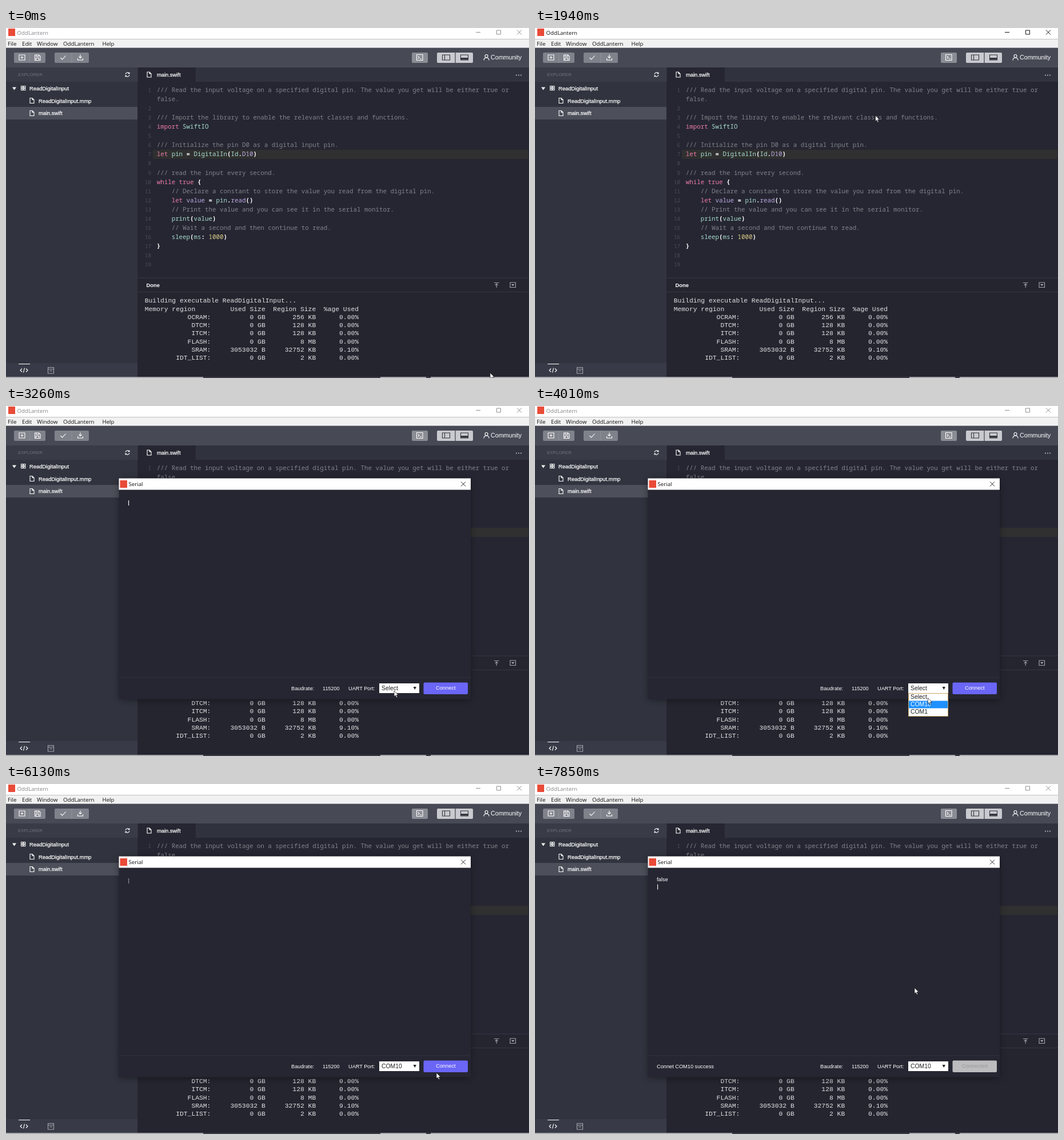
An HTML page for the animation above (8 s loop, 915x612 px).

```html
<!DOCTYPE html>
<html lang="en">
<head>
<meta charset="utf-8">
<title>Serial monitor</title>
<style>
  html, body { margin: 0; width: 100%; height: 100%; overflow: hidden; background: #252631; }
  svg { display: block; width: 915px; height: 612px; }
  text { white-space: pre; fill: #fff; font: 9.35px "Liberation Sans", Arial, sans-serif; }
  .sys { font: 9.7px "Open Sans", "Noto Sans", sans-serif; fill: #111; }
  .code { font: 10.82px "Noto Sans Mono", "DejaVu Sans Mono", monospace; }
  .num { font: 9.2px "Noto Sans Mono", monospace; fill: #4b4d59; text-anchor: end; }
  .con { font: 11.35px "Liberation Mono", monospace; fill: #e2e2e4; }
  .field { font-size: 10.4px; fill: #222; }
  .strong { stroke: #fff; stroke-width: .25; }
  .c { fill: #80828a; } .k { fill: #ec7ca8; } .t { fill: #a9dccf; }
  .p { fill: #bfa8e6; } .n { fill: #e0cf8c; } .w { fill: #fff; font-weight: 600; }
  .line { fill: none; stroke: #fff; stroke-width: 1.1; }
  .dark { stroke: #34353e; }
  .dim { stroke: #a4a6ae; }
</style>
</head>
<body>
<svg id="stage" viewBox="0 0 915 612" xmlns="http://www.w3.org/2000/svg"></svg>
<script>
const LOOP = 8000;
const APP = "OddLantern";

const rect = (x, y, w, h, fill, more = "") =>
  `<rect x="${x}" y="${y}" width="${w}" height="${h}" fill="${fill}" ${more}/>`;
const text = (x, y, s, cls = "", more = "") =>
  `<text x="${x}" y="${y}" class="${cls}" ${more}>${s}</text>`;
const path = (d, cls = "line", more = "") => `<path d="${d}" class="${cls}" ${more}/>`;
const box = (x, y, w, h) => `M${x} ${y}h${w}v${h}h${-w}z`;
const cross = (x, y, r) => `M${x - r} ${y - r}l${2 * r} ${2 * r}M${x + r} ${y - r}l${-2 * r} ${2 * r}`;
const page = (x, y) => path(`M${x} ${y}h4l3 3v6h-7zM${x + 4} ${y}v3h3`);

function chrome() {
  const menu = [[3, "File"], [28, "Edit"], [54, "Window"], [100, APP], [168.5, "Help"]];
  return rect(0, 0, 915, 19.5, "#fff") + rect(0, 19.5, 915, 15.5, "#f1f1f2") +
    rect(4, 1, 12, 13, "#e94b38") +
    text(19.5, 11.5, APP, "sys", 'id="title"') +
    path(`M822 7.5h8${box(858.5, 4, 7, 7)}${cross(898, 7.5, 4)}`, "", 'id="winButtons" fill="none"') +
    menu.map(([x, s]) => text(x, 31, s, "sys")).join("");
}

function toolbar() {
  const fill = "#80828b";
  return rect(0, 34.6, 915, 34.4, "#474955") +
    rect(14, 43, 55, 18, fill, 'rx="2"') + rect(85, 43, 60, 18, fill, 'rx="2"') +
    rect(710, 43, 28, 18, "#8b8d95", 'rx="2"') + rect(754, 43, 63, 18, "#c9cacf", 'rx="2"') +
    path("M41.5 43v18M115 43v18", "line", 'opacity=".12"') +
    path(box(23, 47, 10, 9) + "M28 49v5M25.5 51.5h5") +
    path("M50.5 47h7l2.5 2.5v7h-9.5zM53 47v3h4v-3M52.5 56v-3.5h5v3.5") +
    path("M95.5 52l3 3l6-6.5") +
    path("M130 46.5v6M127.5 50l2.5 2.5l2.5-2.5M125.5 53v3h9v-3") +
    path(box(718.5, 46.5, 10.5, 10) + "M721 49.5l2 2l-2 2M724 54h3") +
    path(box(763.5, 47, 13, 9) + "M767.5 47v9M786 43v18", "line dark") +
    path(box(795.5, 47, 13, 9), "line dark") + rect(796, 52, 12, 3.5, "#34353e") +
    `<circle cx="840.5" cy="49" r="2.5" class="line"/>` + path("M836 56.5c0-6 9-6 9 0") +
    text(848, 55, "Community", "", 'style="font-size:10.7px"');
}

function sidebar() {
  return rect(0, 69, 230, 25, "#393b47") + rect(0, 94, 230, 492, "#31333e") +
    rect(0, 138, 230, 22, "#4d4f5a") + rect(0, 586, 230, 24, "#383b47") +
    text(21, 84, "EXPLORER", "", 'style="font-size:7.9px;fill:#70727d"') +
    path("M209.2 81a3.4 3.4 0 0 1 6.4-1.3M215.8 82a3.4 3.4 0 0 1-6.4 1.3M216 77.5v2.300h-2.300M209 85.500v-2.300h2.300") +
    `<path d="M11 103.5h7l-3.5 5z" fill="#fff"/>` +
    path([[26.5, 101.5], [30.8, 101.5], [26.5, 105.8], [30.8, 105.8]].map(([x, y]) => box(x, y, 3, 3)).join("")) +
    text(41, 109, "ReadDigitalInput", "strong") +
    page(42, 122.5) + text(57, 130.5, "ReadDigitalInput.mmp", "strong") +
    page(42, 144.5) + text(57, 152, "main.swift", "strong") +
    path("M22 587.5h20M28 595.5l-3 3l3 3M35 595.5l3 3l-3 3M32.5 594.5l-2 8") +
    path(box(73.5, 593.5, 10, 10.5) + "M73.5 596.5h10M76 599.5h5", "line dim");
}

// "~" starts a token; the next letter is its colour class.
const CODE = [
  "~c/// Read the input voltage on a specified digital pin. The value you get will be either true or",
  "~cfalse.",
  "",
  "~c/// Import the library to enable the relevant classes and functions.",
  "~kimport~t SwiftIO",
  "",
  "~c/// Initialize the pin D0 as a digital input pin.",
  "~klet~t pin~w = ~tDigitalIn~w(~tId~w.~pD10~w)",
  "",
  "~c/// read the input every second.",
  "~kwhile true~w {",
  "~c    // Declare a constant to store the value you read from the digital pin.",
  "~k    let~p value~w = ~tpin~w.~pread~w()",
  "~c    // Print the value and you can see it in the serial monitor.",
  "~t    print~w(~tvalue~w)",
  "~c    // Wait a second and then continue to read.",
  "~t    sleep~w(~tms~w: ~n1000~w)",
  "~w}",
  "", ""
];

function editor() {
  const rows = CODE.map((src, i) => {
    const y = 111.8 + i * 16.08;
    const spans = src.split("~").slice(1).map(s => `<tspan class="${s[0]}">${s.slice(1)}</tspan>`).join("");
    const num = i === 1 ? "" : text(254, y, i || 1, "num");
    return num + text(263.7, y, spans, "code");
  });
  return rect(230, 69, 685, 25, "#30323d") + rect(231, 69, 101, 25, "#252631") +
    rect(230, 94, 685, 343, "#252631") + rect(257, 213, 657, 16, "#2f302f") +
    page(247, 77) + text(264, 85, "main.swift", "strong") +
    [893, 897, 901].map(x => `<circle cx="${x}" cy="82.5" r="1.1" fill="#b5b6bd"/>`).join("") +
    rows.join("");
}

function consolePane() {
  const regions = [
    ["OCRAM", "0 GB", "256 KB", "0.00%"], ["DTCM", "0 GB", "128 KB", "0.00%"],
    ["ITCM", "0 GB", "128 KB", "0.00%"], ["FLASH", "0 GB", "8 MB", "0.00%"],
    ["SRAM", "3053032 B", "32752 KB", "9.10%"], ["IDT_LIST", "0 GB", "2 KB", "0.00%"]
  ];
  const lines = [
    "Building executable ReadDigitalInput...",
    "Memory region         Used Size  Region Size  %age Used",
    ...regions.map(([a, b, c, d]) => a.padStart(16) + ":" + b.padStart(14) + c.padStart(13) + d.padStart(11))
  ];
  return rect(230, 437, 685, 173, "#24252f") +
    rect(230, 436.5, 685, 1, "#373944") + rect(230, 461, 685, 1, "#343640") +
    text(245.5, 453, "Done", "", 'style="font-weight:bold"') +
    path("M854 445.5h8.5M858.2 454v-6.5M855.8 449.8l2.4-2.4l2.4 2.4", "line dim") +
    path(box(882, 445, 9.5, 8.5), "line dim") + `<path d="M884 448h5.5l-2.7 3z" fill="#b5b6bd"/>` +
    lines.map((s, i) => text(242.7, 480.3 + i * 14.27, s, "con")).join("") +
    rect(0, 610, 915, 2, "#a9aaad") + rect(345, 610, 310, 2, "#3a3b42") + rect(735, 610, 8, 2, "#3a3b42");
}

function dialog() {
  return `<g id="dialog">` +
    rect(199, 129, 612, 384, "#000", 'opacity=".45" filter="url(#soft)"') +
    rect(197.5, 126.5, 615.5, 386, "#252631") + rect(197.5, 126.5, 615.5, 20, "#fff") +
    rect(199.5, 130, 12.5, 13, "#e94b38") + text(214.5, 140, "Serial", "sys") +
    path(cross(800, 136.5, 4), "", 'stroke="#222"') +
    rect(197.5, 474.5, 615.5, 1, "#31333d") +
    text(213, 170, "false", "", 'id="output"') +
    rect(214, 165, 1.1, 9, "#fff", 'id="caret"') +
    text(213, 496.7, "Connet COM10 success", "", 'id="status" style="font-size:9.23px"') +
    text(499, 496.7, "Baudrate:", "", 'style="font-size:9.25px"') +
    text(554, 496.7, "115200", "", 'style="font-size:9.1px"') +
    text(599, 496.7, "UART Port:", "", 'style="font-size:9.2px"') +
    rect(653, 485, 70, 17, "#fff") + text(657, 496.7, "", "field", 'id="port"') +
    `<path d="M712.5 491h5.5l-2.7 5z" fill="#222"/>` +
    rect(730.5, 483.5, 77.5, 20.5, "#6b66f6", 'id="button" rx="2"') +
    text(769.3, 496.3, "", "", 'id="buttonText" text-anchor="middle"') +
    `<g id="list">` + rect(653.5, 502.5, 69, 40, "#fff", 'stroke="#cda968"') +
    rect(654, 502.5, 68, 13, "#1e90ff", 'id="hover"') +
    ["Select", "COM10", "COM1"].map((s, i) => text(657, 512 + i * 13.2, s, "field", `id="option${i}"`)).join("") +
    `</g></g>`;
}

function pointers() {
  const skin = 'fill="#fff" stroke="#15161c" stroke-width=".7"';
  return `<g id="cursor"><circle id="press" cx="-.5" cy="0" r="10.5" fill="#e2cf2e" opacity=".85"/>` +
    `<path id="arrow" d="M0 0v10l2.3-2.1l1.7 3.9l1.7-.7l-1.700-3.800h3.300z" ${skin}/>` +
    `<path id="hand" d="M-1 0q1-1 2 0v4.5l4.5 1.2q1 .5 1 1.5l-1 5h-6l-4.500-4.500q.3-1.500 1.800-.7l2.200 1.500z" ${skin}/>` +
    `<path id="beam" d="M-2 .5h1.5l.5.500l.5-.5h1.5M0 1v9M-2 10.5h1.500l.5-.5l.5.500h1.500" fill="none" stroke="#d8d8da"/></g>`;
}

const stage = document.getElementById("stage");
stage.innerHTML = `<defs><filter id="soft" x="-10%" y="-10%" width="120%" height="120%">` +
  `<feGaussianBlur stdDeviation="7"/></filter></defs>` +
  chrome() + toolbar() + sidebar() + editor() + consolePane() + dialog() + pointers();

const el = id => document.getElementById(id);
const show = (id, on) => el(id).setAttribute("visibility", on ? "inherit" : "hidden");
const within = (t, a, b) => t >= a && t < b;

const BURSTS = [[100, 1000, 7], [1180, 2120, 6], [2320, 3260, 6], [3460, 4200, 5],
  [4780, 5750, 6], [5950, 6890, 6], [7090, 7270, 2], [7660, 7850, 2]];
const TICKS = [0];
for (const [a, b, n] of BURSTS)
  for (let i = 0; i < n; i++) TICKS.push(Math.floor((a + (b - a) * i / (n - 1)) / 10) * 10);

const TRAIL = [[0, 847, 603], [850, 729, 60], [1000, 726, 51.5], [1360, 726, 51.5], [2120, 552, 187],
  [2320, 562, 225], [3260, 679, 498], [3640, 682, 496], [4200, 690, 518], [4700, 690, 518],
  [4970, 732, 518.5], [5160, 704, 518], [5360, 694, 517], [5750, 712, 511], [6130, 753, 505],
  [6320, 767, 490], [6890, 767, 490], [7090, 738, 450], [7270, 664, 356.5], [8000, 664, 356.5]];

function along(t) {
  const i = Math.max(1, TRAIL.findIndex(k => k[0] >= t));
  const [t0, x0, y0] = TRAIL[i - 1], [t1, x1, y1] = TRAIL[i];
  const u = (t - t0) / (t1 - t0);
  return [x0 + (x1 - x0) * u, y0 + (y1 - y0) * u];
}

const CARET_OFF = [[2650, 3180], [3640, 4150], [5300, 5740], [6300, 6800]];

function draw(now) {
  const t = TICKS.findLast(k => k <= now);

  const active = within(t, 1000, 2100);
  el("title").style.fill = active ? "#111" : "#85868a";
  el("winButtons").setAttribute("stroke", active ? "#111" : "#8c8d90");

  const opening = t < 2300;
  const visible = t >= 2100;
  show("dialog", visible);
  el("dialog").setAttribute("opacity", opening ? 0.87 : 1);
  el("dialog").setAttribute("transform",
    opening ? "translate(505.2 319.5) scale(.9925) translate(-505.2 -319.5)" : "");

  const printed = t >= 7660;
  show("output", printed);
  show("caret", visible && !CARET_OFF.some(([a, b]) => within(t, a, b)));
  el("caret").setAttribute("y", printed ? 175.5 : 165);
  el("caret").setAttribute("opacity", within(t, 6100, 6300) ? 0.5 : 1);

  show("list", within(t, 3640, 5500));
  const hover = t < 4000 ? 0 : 1;
  el("hover").setAttribute("y", 502.5 + hover * 13);
  for (let i = 0; i < 3; i++) el("option" + i).style.fill = i === hover ? "#fff" : "#222";
  el("port").textContent = t < 5500 ? "Select" : "COM10";

  const connected = t >= 6690;
  show("status", connected);
  el("button").setAttribute("fill", connected ? "#bcbcbe" : "#6b66f6");
  el("buttonText").textContent = connected ? "Connected" : "Connect";
  el("buttonText").style.fill = connected ? "#9a9a9e" : "#fff";

  const [x, y] = along(t);
  const hand = within(t, 850, 1400) || within(t, 6300, 6690);
  const beam = within(t, 4950, 5100);
  el("cursor").setAttribute("transform", `translate(${x} ${y})`);
  show("press", within(t, 1000, 1300) || within(t, 3460, 3640) || within(t, 5360, 5500) || within(t, 6500, 6690));
  show("hand", hand);
  show("beam", beam);
  show("arrow", !hand && !beam);
}

function tick() {
  draw(performance.now() % LOOP);
  requestAnimationFrame(tick);
}
tick();
</script>
</body>
</html>
```
